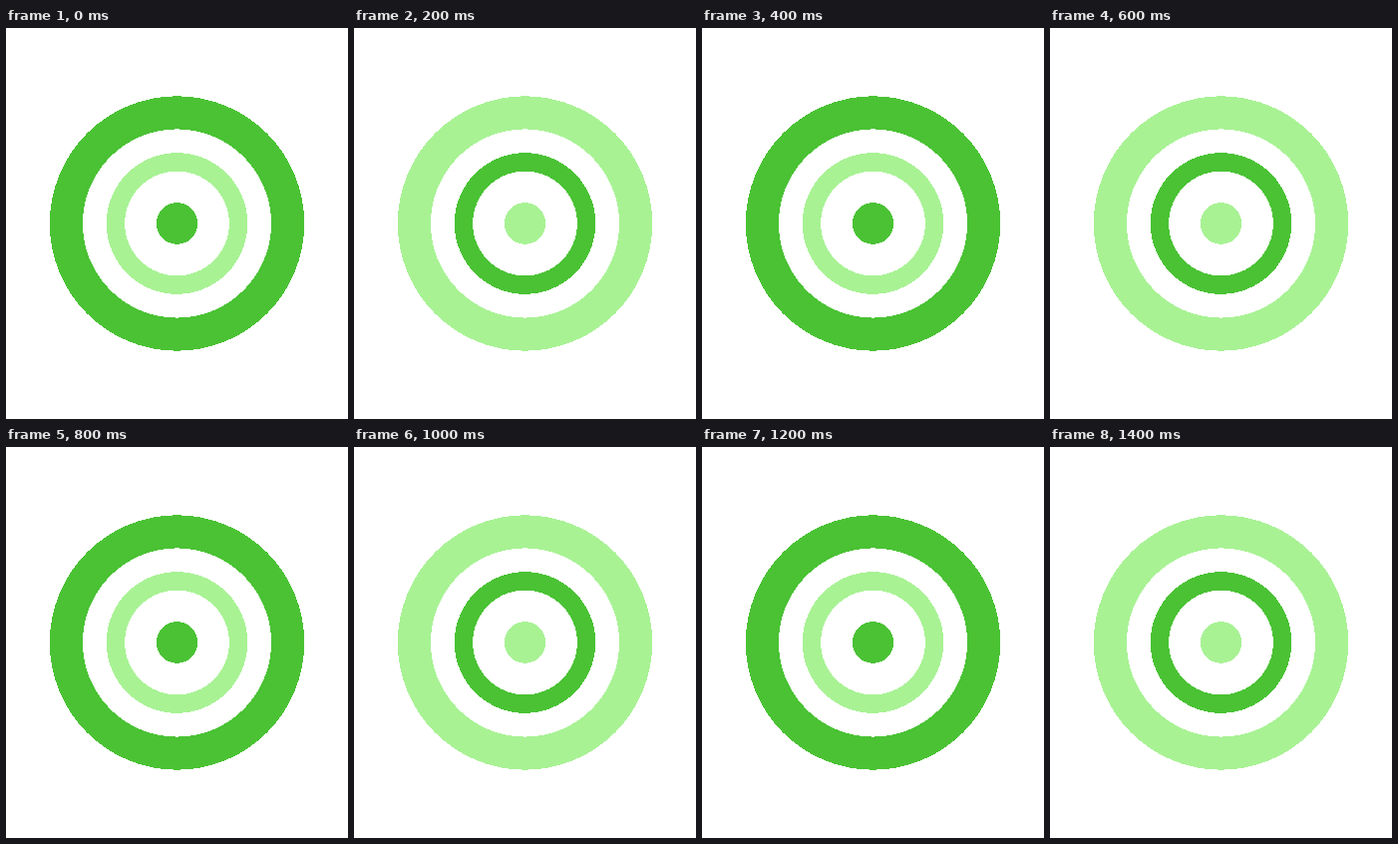
Recreate the animation shown at these times as an HTML page. Size 343x392 px, loop 1600 ms.

```html
<!DOCTYPE html>
<html lang="en">
<head>
<meta charset="utf-8">
<title>Blinking rings</title>
<style>
  html, body { margin: 0; width: 100%; height: 100%; overflow: hidden; background: #fff; }
  svg { display: block; width: 100vw; height: 100vh; shape-rendering: crispEdges; }
  .a, .b { animation: blink 400ms step-end infinite; }
  .a { --on: #4ac234; --off: #a8f294; }
  .b { --on: #a8f294; --off: #4ac234; }
  @keyframes blink {
    0%, 100% { fill: var(--on); }
    50% { fill: var(--off); }
  }
</style>
</head>
<body>
<svg viewBox="0 0 343 392">
  <g transform="translate(171.5 196)" fill="#fff">
    <circle class="a" r="127.7"/>
    <circle r="94.6"/>
    <circle class="b" r="70.8"/>
    <circle r="52.4"/>
    <circle class="a" r="20.8"/>
  </g>
</svg>
</body>
</html>
```
